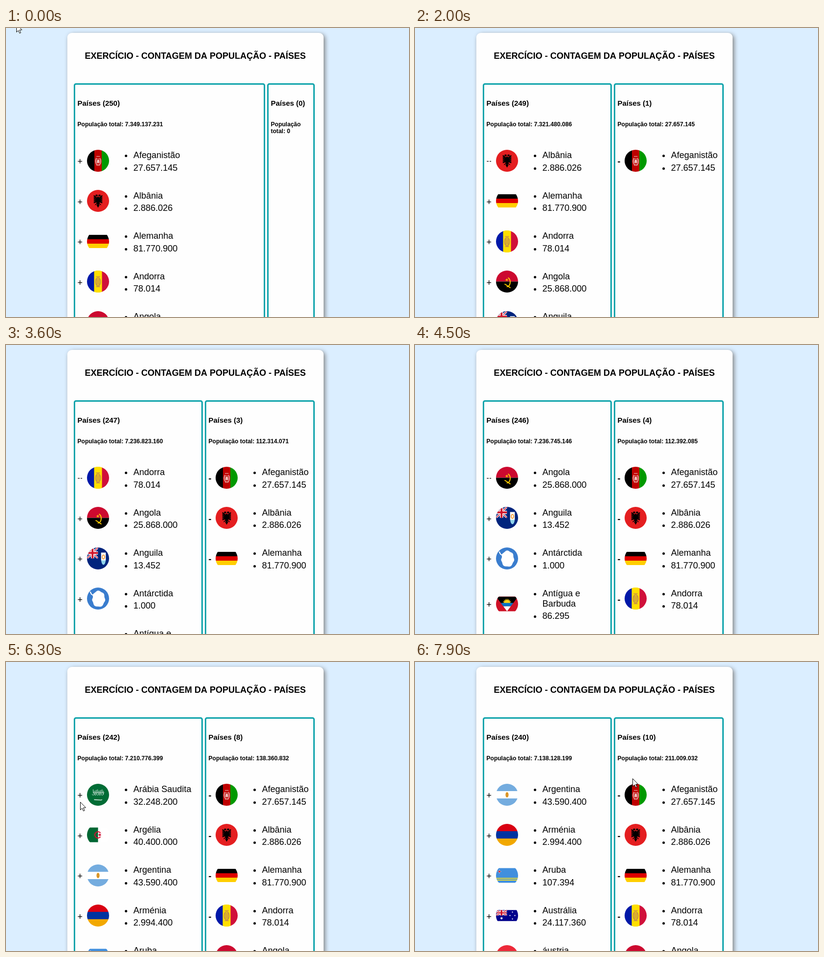
Recreate the animation shown at these times as an HTML page with a canvas. Size 821x591 px, loop 8 s.

```html
<!DOCTYPE html>
<html lang="pt">
<head>
<meta charset="utf-8">
<title>Contagem da população</title>
<style>
html, body { margin: 0; width: 100%; height: 100%; overflow: hidden; background: #dbeeff; }
canvas { display: block; width: 821px; height: 591px; }
</style>
</head>
<body>
<canvas id="stage" width="821" height="591"></canvas>
<script>
const c = document.getElementById('stage').getContext('2d');
const FONT = '"Liberation Sans", Arial, sans-serif';
const LOOP = 8000, WORLD = 7349137231, R = 22.5, ROW = 82.5, LINE = 21;
const CLICKS = [1800, 2800, 3600, 4500, 4800, 5000, 5400, 6300, 7000, 7500];
const PAPER = '#fefefe';

// Drawing helpers
function text(s, x, y, size, bold, align = 'left') {
  c.font = `${bold ? 'bold ' : ''}${size}px ${FONT}`;
  c.textAlign = align;
  c.fillStyle = '#000';
  c.fillText(s, x, y);
}
function rect(color, x, y, w, h) {
  c.fillStyle = color;
  c.fillRect(x, y, w, h);
}
function trace(pts) {
  c.beginPath();
  for (let i = 0; i < pts.length; i += 2) c.lineTo(pts[i], pts[i + 1]);
}
function poly(color, pts) {
  trace(pts);
  c.fillStyle = color;
  c.fill();
}
function line(color, width, pts) {
  trace(pts);
  c.strokeStyle = color;
  c.lineWidth = width;
  c.stroke();
}
function oval(color, x, y, rx, ry = rx) {
  c.beginPath();
  c.ellipse(x, y, rx, ry, 0, 0, 7);
  c.fillStyle = color;
  c.fill();
}
function ring(color, width, x, y, rx, ry = rx, from = 0, to = 2 * Math.PI) {
  c.beginPath();
  c.ellipse(x, y, rx, ry, 0, from, to);
  c.strokeStyle = color;
  c.lineWidth = width;
  c.stroke();
}
// Closed outline from a radius for each angle
function blob(color, x, y, radius, steps, turn = 0) {
  const pts = [];
  for (let i = 0; i < steps; i++) {
    const a = turn + i * 2 * Math.PI / steps, r = radius(a, i);
    pts.push(x + r * Math.cos(a), y + r * Math.sin(a));
  }
  poly(color, pts);
}
function star(color, x, y, r, points = 5, inner = 0.4, turn = -Math.PI / 2) {
  blob(color, x, y, (a, i) => i % 2 ? r * inner : r, points * 2, turn);
}
function bands(colors, h = 45) {
  const s = h / colors.length;
  colors.forEach((k, i) => rect(k, -R, -h / 2 + i * s, 45, s));
}
function pales(colors) {
  colors.forEach((k, i) => rect(k, -R + i * 15, -R, 15, 45));
}
function jack(w, h, top, blue) {
  c.save();
  c.translate(-R, top);
  c.beginPath();
  c.rect(0, 0, w, h);
  c.clip();
  rect(blue, 0, 0, w, h);
  for (const [k, d] of [['#fff', 4], ['#cf142b', 1.4]]) {
    line(k, d, [0, 0, w, h]);
    line(k, d, [0, h, w, 0]);
  }
  for (const [k, d] of [['#fff', 0.3], ['#cf142b', 0.17]]) {
    rect(k, w * (1 - d) / 2, 0, w * d, h);
    rect(k, 0, h * (1 - d) / 2, w, h * d);
  }
  c.restore();
}

// Flags, drawn around their centre inside a clipped circle
const flags = {
  afghanistan() {
    const pale = '#f0c4c0';
    pales(['#000', '#bf0000', '#009900']);
    ring(pale, 1.3, 0.3, 1, 5.6, 8.2, -1, 4.1);
    ring(pale, 0.8, 0.3, 1, 3.8, 6);
    rect(pale, -2.2, 0, 5, 4.5);
    oval(pale, 0.3, -1, 2, 1.7);
    for (const y of [-9, 9]) line(pale, 1.1, [-3.5, y, 4, y]);
  },
  albania() {
    rect('#e41e20', -R, -R, 45, 45);
    oval('#000', 0, 0, 3.4, 9);
    for (const s of [-1, 1]) {
      oval('#000', s * 3, -11, 2.3, 2);
      for (let i = 0; i < 6; i++) line('#000', 2, [0, -4 + i, s * 8.7, -11 + i * 3]);
      line('#000', 1.4, [0, 3, s * 6, 8.5]);
    }
    poly('#000', [-3.5, 8, 3.5, 8, 0, 14]);
  },
  germany() { bands(['#000', '#d00', '#ffce00'], 27); },
  andorra() {
    const tan = '#c28a4c';
    pales(['#0018a8', '#fedf00', '#d0103a']);
    rect('#fedf00', -8, -R, 16, 45);
    ring(tan, 1.5, 0, 0.5, 5.2, 8.5);
    for (let x = -3; x < 4; x += 2) line(tan, 1.2, [x, -6, x, 7]);
    for (const y of [-10, 10.5]) line(tan, 1.3, [-4, y, 4, y]);
  },
  angola() {
    bands(['#cc092f', '#000']);
    ring('#ffcb00', 2, -0.5, 1, 7, 9.5, -1.2, 1.6);
    line('#ffcb00', 2, [-5, 5, 0, 8, 7, 13]);
    star('#ffcb00', -0.5, -3.5, 3.4);
  },
  anguilla() {
    rect('#00247d', -R, -R, 45, 45);
    jack(22.5, 22.5, -R, '#00247d');
    oval('#8fd3ea', 11, 3, 4.6, 10);
    rect('#fff', 6.2, -12, 9.6, 16);
    ring('#f08c1c', 1.6, 11, -3, 2.4, 4);
  },
  antarctica() {
    rect('#3a7dce', -R, -R, 45, 45);
    blob('#fff', 0, 0, a => 14.5 - 1.8 * Math.cos(2 * a) + 1.5 * Math.cos(a - 0.5) + 0.7 * Math.sin(7 * a), 48);
    line('#fff', 2, [-16, -14, -13.5, -9, -9, -6]);
  },
  antigua() {
    rect('#ce1126', -R, -15, 45, 30);
    c.save();
    trace([-R, -15, R, -15, 0, 15]);
    c.clip();
    rect('#000', -R, -15, 45, 14);
    star('#fcd116', 0, -2, 9.5, 16, 0.6);
    rect('#0072c6', -R, -2, 45, 7);
    rect('#fff', -R, 5, 45, 11);
    c.restore();
  },
  saudi() {
    rect('#006c35', -R, -R, 45, 45);
    for (let i = 0; i < 10; i++) {
      const x = -10 + i * 2.3, y = -11 + i * 7 % 4;
      line('#dcebe2', 0.9, [x, y, x + 0.4, y + 8]);
      ring('#dcebe2', 0.8, x, -1 - i % 2 * 4, 1.6, 2, 0, 3.5);
    }
    line('#fff', 1.3, [-8, 10, 6, 10.8, 8.5, 10]);
  },
  algeria() {
    rect('#fff', -R, -15, 45, 30);
    rect('#006633', -R, -15, 22.5, 30);
    ring('#d21034', 2, -0.2, 0, 6.4, 6.4, 0.65, 5.63);
    star('#d21034', 3.5, 0, 4, 5, 0.4, Math.PI);
  },
  argentina() {
    bands(['#74acdf', '#fff', '#74acdf']);
    oval('#e9a32a', 0, 0, 3.1, 5.6);
    ring('#a86a25', 0.7, 0, 0, 1.8, 3.6);
  },
  armenia() { bands(['#d90012', '#0033a0', '#f2a800']); },
  aruba() {
    rect('#418fde', -R, -15, 45, 30);
    for (const y of [5, 8.6]) rect('#fbe122', -R, y, 45, 1.8);
    star('#fff', -15.5, -8, 4.4, 4, 0.36);
    star('#d22630', -15.5, -8, 3.5, 4, 0.36);
  },
  australia() {
    rect('#00008b', -R, -R / 2, 45, R);
    jack(22.5, 11.25, -R / 2, '#00008b');
    star('#fff', -11.25, 5.6, 3.2, 7, 0.45);
    for (let i = 0; i < 4; i++) {
      const a = i * Math.PI / 2;
      star('#fff', 11 + 5 * Math.sin(a), -7 * Math.cos(a), 1.7, 7, 0.45);
    }
  },
  austria() { bands(['#ed2939', '#fff', '#ed2939']); }
};

const countries = [
  ['Afeganistão', 27657145, 'afghanistan'], ['Albânia', 2886026, 'albania'],
  ['Alemanha', 81770900, 'germany'], ['Andorra', 78014, 'andorra'],
  ['Angola', 25868000, 'angola'], ['Anguila', 13452, 'anguilla'],
  ['Antárctida', 1000, 'antarctica'], ['Antígua e|Barbuda', 86295, 'antigua'],
  ['Arábia Saudita', 32248200, 'saudi'], ['Argélia', 40400000, 'algeria'],
  ['Argentina', 43590400, 'argentina'], ['Arménia', 2994400, 'armenia'],
  ['Aruba', 107394, 'aruba'], ['Austrália', 24117360, 'australia'],
  ['áustria', 8725931, 'austria']
];
const dots = n => String(n).replace(/\B(?=(\d{3})+$)/g, '.');

function flag(name, x, y) {
  c.save();
  c.translate(x, y);
  c.beginPath();
  c.arc(0, 0, R, 0, 7);
  c.clip();
  flags[name]();
  c.restore();
}
function list(items, sign, x, flagX) {
  let y = 0;
  for (const [name, people, key] of items) {
    if (y > 345) break;
    const lines = name.split('|'), extra = (lines.length - 1) * LINE;
    const mid = y + extra / 2;
    const nameY = Math.round(266.3 + y), numY = Math.round(291.6 + y + extra);
    text(sign, x, Math.round(279.3 + mid), 18, sign === '-');
    flag(key, flagX + R, 271.5 + Math.floor(mid));
    for (const base of [nameY, numY]) oval('#000', flagX + 79.5, base - 4.5, 2.5);
    lines.forEach((s, i) => text(s, flagX + 94.4, nameY + i * LINE, 18));
    text(dots(people), flagX + 94.4, numY, 18);
    y += ROW + extra;
  }
}
function column(x, right, count, total, wrap) {
  c.beginPath();
  c.roundRect(x + 1.5, 114.5, right - x - 3, 600, 3);
  c.strokeStyle = '#0ea3ab';
  c.lineWidth = 3;
  c.stroke();
  const tx = x + 7.5, label = ['População', `total: ${dots(total)}`];
  text(`Países (${count})`, tx, 159, 14.94, true);
  (wrap ? label : [label.join(' ')]).forEach((s, i) => text(s, tx, 201 + i * 14, 12.06, true));
}
function card() {
  rect('#dbeeff', 0, 0, 821, 591);
  c.save();
  c.shadowColor = '#808080';
  c.shadowBlur = 10;
  c.shadowOffsetX = c.shadowOffsetY = 3;
  c.beginPath();
  c.roundRect(125, 10, 522, 700, 9);
  c.fillStyle = PAPER;
  c.fill();
  c.restore();
  text('EXERCÍCIO - CONTAGEM DA POPULAÇÃO - PAÍSES', 385.6, 63, 18, true, 'center');
}

// The text pointer inverts the upright of the first plus sign
function beam(t) {
  let x = 0;
  if (t >= 1100 && t < 1400) x = 153 - (t - 1100) / 50;
  else if ((t >= 2000 && t < 5400) || (t >= 6600 && t < 7500)) x = 150;
  if (x) rect(PAPER, x, 268, 2, 10);
}
function mix(a, b, u) {
  const k = u * u * (3 - 2 * u);
  return a.map((v, i) => v + (b[i] - v) * k);
}
function pointer(t) {
  const home = [21, -8], far = [543, 571], plus = [151, 270];
  if (t < 200) return home;
  if (t < 500) return mix(home, far, (t - 100) / 400);
  if (t < 900) return mix(far, plus, (t - 500) / 400);
  if (t >= 5900 && t < 6300) return [148, 271];
  if (t >= 6300 && t < 6600) return [151, 286];
  if (t >= 7600) return mix(plus, [443, 238], (t - 7500) / 400);
  return null;
}
function arrow([x, y]) {
  c.save();
  c.translate(Math.floor(x) + 0.5, Math.floor(y) + 0.5);
  poly('#fff', [0, 0, 0, 16, 3.6, 12.6, 6.2, 18.2, 8.6, 17.2, 6.1, 11.6, 11, 11.4]);
  c.closePath();
  c.strokeStyle = '#000';
  c.lineWidth = 1;
  c.stroke();
  c.restore();
}

function draw(now) {
  const t = Math.floor(now % LOOP / 100) * 100;
  const n = CLICKS.filter(k => t >= k).length;
  const chosen = countries.slice(0, n);
  const sum = chosen.reduce((s, k) => s + k[1], 0);
  card();
  column(138, n ? 401 : 528, 250 - n, WORLD - sum);
  column(n ? 405 : 532, 629, n, sum, !n);
  list(countries.slice(n), '+', 145.5, 165);
  list(chosen, '-', 412.5, 427);
  beam(t);
  const p = pointer(t);
  if (p) arrow(p);
}
const start = performance.now();
function tick() {
  draw(performance.now() - start);
  requestAnimationFrame(tick);
}
tick();
</script>
</body>
</html>
```
